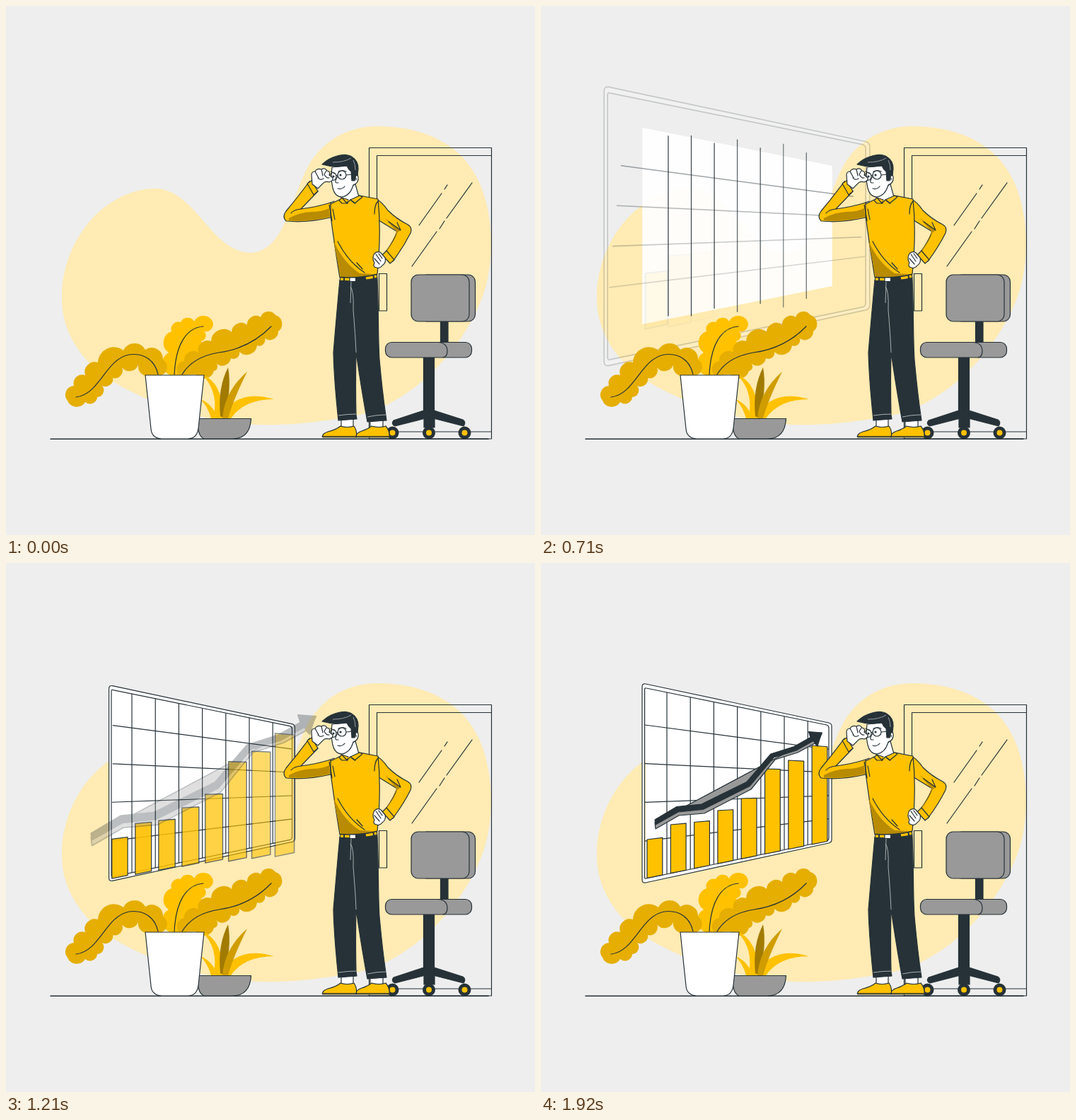
Write an HTML page that moves like this. It is 748 px wide and 748 px high and loops after 1.96 s.

```html
<!DOCTYPE html>
<html>
<head>
<meta charset="utf-8">
<style>
  html, body { margin: 0; height: 100%; overflow: hidden; background: #eee; }
  svg { display: block; width: 100vw; height: 100vh; }
  .zoom { transform-box: fill-box; transform-origin: center; opacity: 0; }
  .ink { stroke: #263238; stroke-width: 1.2; stroke-linejoin: round; stroke-linecap: round; }
  .none { fill: none; }
  .dark { fill: #263238; }
  .sun { fill: #ffc100; }
  .gold { fill: #e5ae00; }
  .shade { fill: #b88b00; }
  .grey { fill: #999; }
  .white { fill: #fff; }
</style>
</head>
<body>
<svg viewBox="0 0 748 748">
  <path fill="#ffebb3" d="M79 410C80 330 140 258 213 258C270 262 290 349 347 349C400 346 405 250 437 212C460 182 495 169 530 170C600 172 645 200 667 245C690 290 694 370 668 425C640 490 570 566 490 580C450 587 420 591 385 592C290 596 190 560 130 517C95 485 78 450 79 410Z"/>

  <g class="ink none">
    <path d="M513.500 612V200.500H686.500V612ZM524.500 602V211.500H686.500V602ZM527.500 378.500H538.500V431H527.500Z"/>
    <path d="M624 253L620 259M616 265L584 310M659 250L623 300M620 304L613 315M609 319L574 368"/>
    <path d="M63 612.300H682" stroke-width="1.500"/>
  </g>

  <g id="chart"></g>
  <g id="plants"></g>

  <!-- small bowl -->
  <path class="sun" d="M293 583Q302 545 276 520Q309 534 306 583ZM303 583Q325 540 379 556Q337 556 318 583ZM290 583Q285 566 275 556Q291 562 300 583Z"/>
  <path fill="#a17a00" d="M303 580Q299 540 314 511Q320 545 307 582Z"/>
  <path fill="#d09d00" d="M306 583Q309 545 341 517Q322 555 314 583Z"/>
  <path class="ink grey" d="M271 583.500H346.500Q345 612 320 612H280Q270 608 271 583.500Z"/>
  <path class="ink white" d="M197 522H280L272 597Q270 612 257 612H220Q206 611 205 598Z"/>

  <!-- chair -->
  <g class="ink">
    <path class="dark" d="M614.500 446H625V476H614.500ZM590.500 497H605.500V572L646 585Q651 588 647 594L606 583.500V596H591V583.500L550 594Q544 591 548 586L590.500 572Z"/>
    <rect class="grey" x="585" y="380" width="78.500" height="66" rx="10"/>
    <rect class="grey" x="573" y="380" width="82" height="66" rx="10"/>
    <rect class="grey" x="536.500" y="475.500" width="122" height="21.500" rx="9"/>
    <path class="none" d="M612 475.500Q624 477 624 488Q624 496 618 497"/>
  </g>
  <g class="sun" stroke="#263238" stroke-width="5">
    <circle cx="546.500" cy="603.500" r="6.500"/>
    <circle cx="598" cy="603.500" r="6.500"/>
    <circle cx="648.500" cy="603.500" r="6.500"/>
  </g>

  <!-- legs -->
  <g class="ink">
    <path class="white" d="M474 583H491V597H474ZM515 584H533V598H515Z"/>
    <path class="sun" d="M448 610Q446 605 455 602Q467 599 473 594Q482 597 492 594Q497 601 495 610ZM495 610Q494 604 503 601Q512 598 517 594Q527 597 537 594Q543 601 542 610Z"/>
    <path class="none" d="M447 608.500H495M495 608.500H542"/>
    <path class="dark" d="M472 387L525 386C527 430 526 470 528 500Q532 545 537 579L538 586L511 588Q503 545 495 490Q494 540 495 578L496 584L470 586Q464 530 463 490Q468 430 472 387Z"/>
  </g>
  <path class="none" stroke="#c8cccd" stroke-width=".8" d="M487 397Q492 402 491 430Q494 465 495 490M488 390L487 420M470 579Q483 577 495 577M511 581Q524 578 537 578"/>

  <!-- arm at the hip -->
  <g class="ink">
    <path class="sun" d="M523 273Q531 276 540 289Q552 301 568 309Q575 313 572 321Q562 341 547 361L536 349Q549 331 553 319L527 303Z"/>
    <path class="shade" stroke="none" d="M536 300L558 317L552 322L540 345L538 346Q548 331 552 319Z"/>
    <path class="none" d="M541 305L558 317L553 306"/>
    <path class="sun" d="M538 346L549 359L543 364L532 352Z"/>
  </g>

  <!-- sweater -->
  <g class="ink">
    <path class="sun" d="M471 274L500 268L526 273Q531 320 525 379Q500 386 472 384Q463 330 457 281Z"/>
    <path class="shade" stroke="none" d="M463 332Q476 362 500 378L520 379Q500 386 473 383Z"/>
    <path class="none" d="M469 333Q484 362 507 377M526 276Q521 281 521 294M462 287L465 302M496 363L504 372"/>
    <path class="sun" d="M459 278Q440 284 417 287L441 262L429 248Q412 271 396 290Q390 298 396 304Q425 307 459 299Z"/>
    <path class="shade" stroke="none" d="M400 300Q414 292 432 291Q448 291 457 286L458 298Q425 306 400 303Z"/>
    <path class="none" d="M417 287Q407 288 403 293M459 278L464 276M457 281Q459 291 461 304"/>
    <path class="sun" d="M426 251L432 247L441 262L435 267Z"/>
  </g>
  <path class="none" stroke="#263238" stroke-width="6.500" d="M472 386Q499 388 525 382"/>
  <path class="none" stroke="#ffc100" stroke-width="3.500" stroke-dasharray="4 2 8 22 10 2" d="M473 386Q499 388 524 382"/>
  <rect class="ink white" x="486" y="384" width="8.500" height="5.500"/>

  <!-- hands -->
  <g class="ink">
    <path class="white" d="M521 350Q526 346 530 349L536 356Q538 363 532 367Q528 372 524 370Q518 369 521 363Q517 357 521 350Z"/>
    <path class="none" d="M523 351L530 361M521 357L528 365M527 350L532 357"/>
  </g>

  <!-- head -->
  <g class="ink">
    <path class="white" d="M475 262L474 273L483 279L499 270L494 252Z"/>
    <path class="white" d="M461 228Q459 246 462 257Q465 270 475 270Q487 268 491 253Q499 251 498 241Q496 236 491 239L488 225Z"/>
    <path class="dark" d="M447 224Q456 215 468 212Q482 208 490 214Q498 219 498 230L497 240Q494 238 493 247L489 247L488 234Q484 231 482 226Q464 229 447 224Z"/>
    <path class="none" d="M492 243Q496 242 495 246M469 241Q464 248 467 250L470 250M469 258Q475 260 479 255M470 234Q476 231 481 234M459 234L465 237M481 239L491 238"/>
    <circle class="none" cx="475" cy="239" r="6"/>
    <ellipse class="none" cx="462.500" cy="241" rx="4.500" ry="5.500"/>
    <path class="none" d="M467 240L469 239"/>
    <circle class="dark" cx="473" cy="239" r="1"/>
    <circle class="dark" cx="463" cy="241" r="1"/>
    <path class="sun" d="M475 271L484 274L482 279L475 279L471 275ZM500 268L487 274L493 279L504 270Z"/>
    <path class="sun" stroke="none" d="M483 275L487 274L490 279L483 279Z"/>
    <path class="none" d="M475 271L482 279L487 274L494 279"/>
    <path class="white" d="M433 252L432 239Q432 234 437 234Q440 229 446 231Q451 228 454 233Q459 234 457 239L462 243Q463 247 457 249Q451 247 447 252L441 258Z"/>
    <path class="none" d="M437 234L442 243M446 231L448 240M453 233L450 238Q453 244 457 243M441 243Q444 247 449 244"/>
  </g>
  <path class="none" stroke="#c8cccd" stroke-width=".7" d="M462 221Q478 221 488 215M491 218Q494 224 494 232"/>
</svg>

<script>
const LOOP = 1960, SPAN = 1000, FPS = 24;
const chart = document.getElementById('chart');
const plants = document.getElementById('plants');
const zooms = [];

function add(parent, tag, cls, attrs = {}) {
  const el = document.createElementNS('http://www.w3.org/2000/svg', tag);
  el.setAttribute('class', cls);
  for (const k in attrs) el.setAttribute(k, attrs[k]);
  return parent.appendChild(el);
}

// A part that shrinks into place from `start` milliseconds on
function zoom(parent, tag, cls, start, attrs) {
  const el = add(parent, tag, 'zoom ' + cls, attrs);
  zooms.push({ el, start });
  return el;
}

// Lines on the board run to a vanishing point at mid height
const MID = 311.5;
const slant = (y, dx) => y + (MID - y) * .0015 * dx;

zoom(chart, 'path', 'white', 96, { d: 'M148 177L407 229V393L148 445Z' });

const grid = zoom(chart, 'g', 'ink none', -27);
[0, 2, 1, 4, 3, 6, 5].forEach((col, i) => {
  const x = 178 + 33.2 * col, dx = x - 147;
  zoom(grid, 'path', '', 44 + 44.4 * i, { d: `M${x} ${176 + .2 * dx}V${446 - .204 * dx}` });
});
for (let i = 0; i < 4; i++)
  zoom(grid, 'path', '', 355 + 44.4 * i, { d: `M147 ${229 + 54.7 * i}L407.500 ${263.500 + 32.7 * i}` });

zoom(chart, 'path', 'ink white', 475, {
  'fill-rule': 'evenodd',
  d: 'M148 171L407 226Q411 227 411 231V391Q411 395 407 396L148 452Q143 453 143 448V175Q143 170 148 171Z' +
     'M149 177L404 229Q407 230 407 233V389Q407 392 404 393L149 446Q146.500 447 146.500 444V179Q146.500 176 149 177Z'
});

const bars = zoom(chart, 'g', 'ink sun', -27);
[391, 370, 366.5, 350, 333, 291, 279, 258].forEach((top, i) => {
  const x = 150 + 33.3 * i, w = 21.8, base = 445.5 - .204 * (x - 150);
  zoom(bars, 'path', '', 576 + 35 * i, {
    d: `M${x} ${top}L${x + w} ${slant(top, w)}V${base - .204 * w}L${x} ${base}Z`
  });
});

const arrow = zoom(chart, 'g', 'ink', 915);
add(arrow, 'path', 'grey', { d: 'M161 367L162 376L195 357L231 354L297 320L331 278L363 268L387 255L391 259L396 242Z' });
add(arrow, 'path', 'dark', { d: 'M161 363L192 344.500L227 341L291 309.500L325 270L358 259.500L381 246.500L378.500 238.500L397.500 240L390 257.500L385 251.500L361 265L329 275L295 315.500L229 348.500L194 352L162 370Z' });

// Leaf outline: round lobes between neighbouring notches
function leaf(cls, notches, vein) {
  const [first, ...rest] = notches;
  let [x, y] = first, d = `M${first}`;
  for (const [u, v] of rest) {
    const r = Math.hypot(u - x, v - y) * .56;
    d += `A${r} ${r} 0 0 1 ${u} ${v}`;
    [x, y] = [u, v];
  }
  add(plants, 'path', cls, { d: d + 'Z' });
  add(plants, 'path', 'ink none', { d: vein });
}

leaf('sun',
  [[232, 522], [230, 490], [234, 460], [247, 447], [266, 446], [292, 446], [280, 460], [276, 474], [264, 494], [252, 522]],
  'M238 521C240 480 254 455 279 453');
leaf('gold',
  [[245, 522], [252, 502], [272, 490], [290, 474], [319, 461], [341, 451], [360, 440], [381, 437], [385, 460], [366, 470], [355, 480], [330, 489], [318, 498], [297, 505], [294, 516], [268, 521]],
  'M249 521Q264 496 301 490Q345 484 375 453');
leaf('gold',
  [[208, 522], [187, 507], [164, 511], [151, 526], [136, 537], [129, 553], [112, 560], [87, 558], [96, 537], [112, 522], [130, 504], [166, 487], [197, 486], [222, 500], [220, 522]],
  'M215 521C211 502 196 490 174 493C141 499 132 550 99 553');

const cubic = (s, a, b) => 3 * (1 - s) * s * ((1 - s) * a + s * b) + s ** 3;

// Ease with a slight overshoot
function ease(p) {
  if (p <= 0) return 0;
  if (p >= 1) return 1;
  let lo = 0, hi = 1;
  for (let i = 0; i < 24; i++) {
    const s = (lo + hi) / 2;
    if (cubic(s, .36, .5) < p) lo = s; else hi = s;
  }
  return cubic(lo, -.01, 1.38);
}

const begin = performance.now();
function draw(now) {
  const t = Math.max(0, now - begin) % LOOP;
  const held = Math.floor((t + 8) * FPS / 1000) * 1000 / FPS;
  for (const { el, start } of zooms) {
    const e = ease((held - start) / SPAN);
    el.style.transform = `scale(${1.5 - e / 2})`;
    el.style.opacity = Math.min(1, Math.max(0, e));
  }
  requestAnimationFrame(draw);
}
draw(begin);
</script>
</body>
</html>
```
